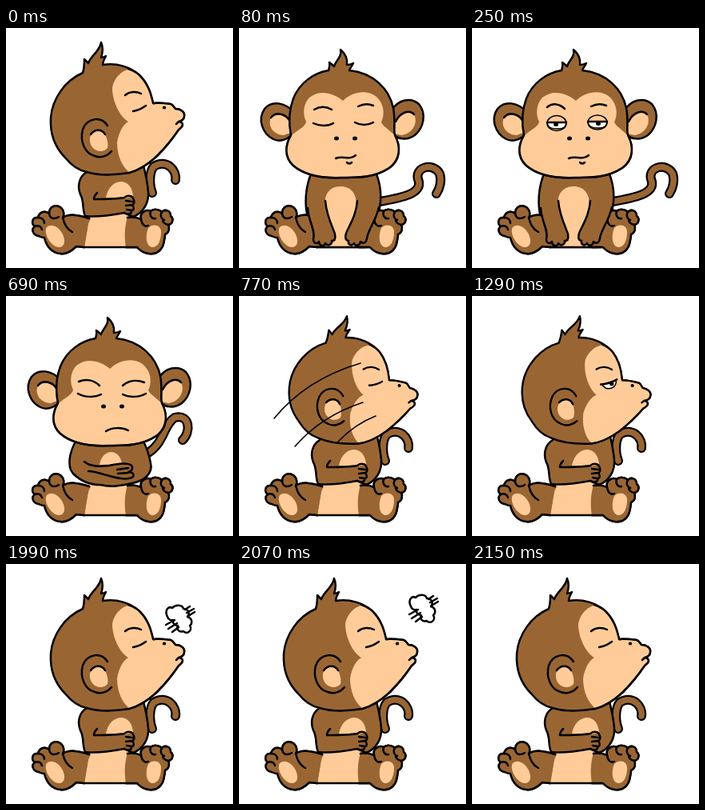
An HTML page that plays this animation: 284x300 px, repeating every 2590 ms.

```html
<!DOCTYPE html>
<html lang="en">
<head>
<meta charset="utf-8">
<title>Grumpy monkey</title>
<style>
  html, body { margin: 0; width: 100%; height: 100%; overflow: hidden; background: #fff; }
  svg { display: block; width: 100%; height: 100%; }
  path, ellipse { stroke: #000; stroke-width: 2.5; stroke-linecap: round; stroke-linejoin: round; fill: none; }
  .fur { fill: #996633; }
  .skin { fill: #ffcc99; }
  .white { fill: #fff; }
  .ink { fill: #000; stroke: none; }
  .flat { stroke: none; }
  .thin { stroke-width: 1.6; }
  .tail { stroke-width: 12; }
  .tail.inner { stroke: #996633; stroke-width: 7.5; }
  [data-part] { visibility: hidden; }
</style>
</head>
<body>
<svg viewBox="0 0 284 300">
  <defs>
    <g id="feet">
      <path class="fur" d="M98 274L88 273C82 279 76 283 68 282C58 281 51 274 48 262C45 262 43 261 41 260C34 259 31 252 36 248C31 244 33 236 40 237C42 229 50 228 54 232C54 223 62 220 68 224C73 228 73 234 71 237C78 232 88 233 104 238"/>
      <path d="M36 248C40 246 44 248 45 252M40 237C45 237 48 240 48 244M54 232C55 238 60 240 66 236M71 237C73 246 77 252 83 255"/>
      <path class="skin flat" d="M51 249C58 243 67 250 71 258C75 267 73 274 66 274C57 274 46 257 51 249Z"/>
      <path class="fur" d="M150 274L164 274C170 281 180 284 188 281C197 277 198 267 199 258C204 256 205 250 203 246C209 245 210 238 206 235C206 228 199 226 195 230C191 226 184 226 181 229C175 226 167 231 169 239C164 237 158 236 152 237"/>
      <path d="M169 239C170 246 174 249 178 247M181 229C179 235 183 239 187 238M195 230C192 235 195 239 198 240M203 246C199 245 196 243 196 240"/>
      <path class="skin flat" d="M178 250C184 244 194 246 194 255C194 266 190 274 183 274C175 273 174 260 178 250Z"/>
    </g>
    <g id="belly">
      <path class="skin flat" d="M98 232H156V274H97Z"/>
      <path class="fur flat" d="M152 236C148 250 148 262 150 274H164V236ZM106 238C100 250 97 262 98 274H92V236Z"/>
      <path d="M96 274H165"/>
    </g>
  </defs>

  <g data-part="relaxed">
    <path class="tail" d="M176 217C205 212 228 207 225 192C217 174 243 167 251 182C254 191 251 201 247 207"/>
    <path class="tail inner" d="M176 217C205 212 228 207 225 192C217 174 243 167 251 182C254 191 251 201 247 207"/>
    <use href="#feet"/>
    <path class="fur" d="M91 180C83 198 81 222 87 240L98 274H156L171 241C179 222 180 202 171 180Z"/>
    <path class="skin flat" d="M127 198C112 198 106 210 108 222C114 242 121 258 121 266L105 274H150L134 265C138 252 145 238 147 221C147 207 140 198 127 198Z"/>
    <use href="#feet"/>
    <path class="fur" d="M86 225C87 243 96 252 93 264C93 270 98 270 100 267C101 274 107 273 108 269C111 274 117 270 116 266C122 266 121 258 118 252C113 240 109 229 108 216"/>
    <path class="fur" d="M175 224C171 242 161 253 160 263C159 269 155 270 152 267C151 273 145 273 144 269C140 274 136 270 137 266C131 265 133 257 137 250C142 240 147 230 148 216"/>
    <path d="M97 274H160"/>
  </g>

  <g data-part="crossedFront">
    <path class="tail" d="M178 196C199 182 197 161 211 152C231 147 231 171 221 180"/>
    <path class="tail inner" d="M178 196C199 182 197 161 211 152C231 147 231 171 221 180"/>
    <use href="#belly"/>
    <use href="#feet"/>
    <path class="fur" d="M88 180C79 196 76 213 84 222C94 232 106 236 118 236C134 240 148 236 158 234C173 231 184 222 181 209C179 198 176 189 171 180Z"/>
    <path class="skin flat" d="M117 211C119 199 126 195 132 195C140 196 144 202 145 210Z"/>
    <path d="M98 207C106 214 118 213 129 212C140 210 150 208 156 211C160 214 158 219 153 220C161 220 162 227 154 228C144 230 134 226 126 224C117 222 109 218 103 219M139 217L153 215M140 222L153 221"/>
    <use href="#feet"/>
  </g>

  <g data-part="crossedSide">
    <path class="tail" d="M183 206C179 196 179 180 185 173C201 163 214 178 212 190"/>
    <path class="tail inner" d="M183 206C179 196 179 180 185 173C201 163 214 178 212 190"/>
    <use href="#belly"/>
    <use href="#feet"/>
    <path class="fur" d="M101 180C91 186 89 198 93 208C98 216 95 227 99 235C113 237 132 234 148 231L159 236C172 231 179 218 178 205C177 194 175 184 172 172"/>
    <path class="skin flat" d="M125 212C128 197 137 192 145 192C154 193 158 201 159 210L150 213Z"/>
    <path d="M114 206C111 209 110 212 110 214C123 214 137 214 148 212C152 209 158 209 159 213C162 217 160 220 158 221C161 225 160 228 157 228C158 232 153 234 148 231M150 216L158 217M150 222L158 221M151 227L157 228"/>
    <use href="#feet"/>
  </g>

  <g data-part="frontHead">
    <path class="fur" d="M68 105C58 93 41 90 32 101C23 114 29 132 43 139C51 143 61 139 65 134Z"/>
    <path class="skin flat" d="M64 117C59 107 46 104 40 112C35 123 44 134 56 134L64 131Z"/>
    <path d="M64 117C59 107 46 104 40 112"/>
    <path class="fur" d="M190 104C199 89 215 86 225 95C235 107 231 125 220 134C210 141 199 139 193 133Z"/>
    <path class="skin flat" d="M196 117C201 106 213 101 219 108C225 120 215 133 203 134L195 132Z"/>
    <path d="M196 117C201 106 213 101 219 108"/>
    <path class="fur" d="M112 53C113 49 114 46 113 43C116 45 118 47 119 48C121 40 129 37 127 27C133 32 136 39 135 46C138 46 141 45 143 44C141 48 139 50 138 53C168 56 188 76 193 100C196 115 193 126 195 134C202 147 203 164 188 175C168 188 147 187 128 187C103 188 82 184 68 172C56 161 58 146 65 134C62 119 62 104 68 88C76 68 94 56 112 53Z"/>
    <path class="skin flat" d="M65 135C72 128 83 124 84 117C79 107 81 94 88 87C100 77 117 80 130 91C143 78 163 77 173 87C181 95 183 107 178 118C182 125 190 128 195 135C201 148 202 164 187 174C168 186 147 186 128 186C103 187 82 183 68 171C57 160 59 146 65 135Z"/>
    <path d="M65 134C58 146 56 161 68 172C82 184 103 188 128 187C147 187 168 188 188 175C203 164 202 147 195 134"/>
    <ellipse class="ink" cx="122" cy="138" rx="3" ry="2.5"/>
    <ellipse class="ink" cx="145" cy="138" rx="3" ry="2.5"/>
  </g>

  <g data-part="smirk">
    <path d="M121 163C130 159 138 166 146 159M135 168C137 170 139 170 141 168"/>
    <path d="M149 98C155 95 161 94 168 97"/>
  </g>
  <g data-part="blink">
    <path d="M94 102C101 98 109 98 116 102M93 119C101 123 111 123 118 119M145 118C152 122 161 122 168 118"/>
  </g>
  <g data-part="stare">
    <path d="M94 99C101 93 110 95 116 101"/>
    <ellipse class="skin thin" cx="106" cy="119" rx="12" ry="9.5"/>
    <ellipse class="skin thin" cx="157" cy="118" rx="12" ry="9"/>
    <path class="white thin" d="M94 118H118C117 126 112 126 106 126C100 126 95 125 94 118Z"/>
    <path class="white thin" d="M145 117H169C168 125 163 125 157 125C151 125 146 124 145 117Z"/>
    <path d="M94 118H118M145 117H169"/>
    <ellipse class="ink" cx="105" cy="120.5" rx="3" ry="2.5"/>
    <ellipse class="ink" cx="158" cy="119.5" rx="3" ry="2.5"/>
  </g>
  <g data-part="frown">
    <path d="M91 107C100 103 110 105 117 112M146 112C153 106 163 104 173 108M90 122C99 127 111 127 119 123M146 123C154 127 166 127 175 122M125 169C133 164 145 164 153 168"/>
  </g>

  <g data-part="sideHead" id="side">
    <path class="fur" d="M96 56C98 50 98 44 98 39C100 41 102 43 103 44C106 34 117 30 119 18C122 25 121 31 119 37C121 37 123 36 125 35C123 39 121 42 121 46C139 43 156 49 167 59C177 69 181 80 184 94C191 93 199 94 206 95C209 96 210 99 212 101C217 101 224 104 223 110C223 114 220 116 216 117C222 118 223 122 216 127C208 139 199 150 189 160C177 171 166 178 154 181C136 184 117 185 101 180C91 178 82 172 74 162C60 148 55 130 56 112C58 89 73 66 96 56Z"/>
    <path class="skin flat" d="M153 52C142 54 133 67 133 77C134 95 144 112 153 117C146 121 141 131 139 143C139 159 145 173 154 180C166 177 177 170 188 159C198 149 207 138 215 127C222 122 221 118 216 117C220 115 222 113 222 109C222 105 217 102 212 102C209 99 208 96 205 96C199 95 191 94 184 96C181 80 176 70 167 60C163 56 158 53 153 52Z"/>
    <path d="M153 51C159 53 163 55 167 59C177 69 181 80 184 94C191 93 199 94 206 95C209 96 210 99 212 101C217 101 224 104 223 110C223 114 220 116 216 117C222 118 223 122 216 127C208 139 199 150 189 160C177 171 166 178 154 181M213 120L216 117"/>
    <ellipse class="ink" cx="198" cy="99.5" rx="2.2" ry="2"/>
    <path class="fur" d="M127 122C118 109 101 113 96 127C92 142 99 157 111 160C119 163 127 160 132 154"/>
    <path class="skin flat" d="M107 132C112 126 121 127 124 133C127 139 128 146 127 150C122 156 113 155 108 149C104 144 104 137 107 132Z"/>
    <path d="M106 133C111 126 120 126 124 133"/>
    <path d="M149 84C155 79 163 79 169 82"/>
    <path data-part="sideShut" d="M159 104C165 103 171 100 175 97"/>
    <g data-part="sideOpen">
      <path class="white thin" d="M158 103L176 95C178 103 172 108 164 107Z"/>
      <path d="M157 103C164 102 171 99 177 94"/>
      <ellipse class="ink" cx="171" cy="100.5" rx="2.8" ry="2.6"/>
    </g>
  </g>

  <path data-part="whoosh" class="thin" d="M44 153Q84 104 152 84M70 188Q103 150 155 133M124 182Q145 160 171 150"/>

  <g data-part="puff" id="puff">
    <path class="white" d="M202 66C198 58 203 52 208 55C212 50 221 51 222 56C229 56 230 63 227 66C234 68 233 75 230 77C234 83 226 89 222 84C216 86 213 81 215 77C211 77 208 74 209 70C206 71 203 69 202 66Z"/>
    <path d="M211 70L200 76M214 74L203 81M216 79L208 85M224 57L230 53M226 61L235 56M228 65L236 60"/>
  </g>
</svg>
<script>
const LOOP = 2590;
const side = "crossedSide sideHead ";
const front = "relaxed frontHead smirk ";
const level = "translate(117 139) rotate(7) scale(.96) translate(-115 -138)";

// start time, visible parts, head transform, puff transform
const steps = [
  [0, side + "sideShut"],
  [80, front + "blink"],
  [250, front + "stare"],
  [690, "crossedFront frontHead frown"],
  [770, side + "sideShut whoosh", level],
  [850, side + "sideShut", level],
  [1290, side + "sideOpen", level],
  [1990, side + "sideShut puff"],
  [2070, side + "sideShut puff", "", "translate(13 -13)"],
  [2150, side + "sideShut"]
];

const parts = [...document.querySelectorAll("[data-part]")];
const head = document.getElementById("side");
const puff = document.getElementById("puff");
let shown;

function show(step) {
  const [, names, tilt = "", drift = ""] = step;
  const on = new Set(names.split(" "));
  for (const el of parts) el.style.visibility = on.has(el.dataset.part) ? "visible" : "hidden";
  head.setAttribute("transform", tilt);
  puff.setAttribute("transform", drift);
}

const origin = performance.now();
function tick() {
  const t = (performance.now() - origin) % LOOP;
  const step = steps.findLast(s => s[0] <= t);
  if (step !== shown) show(shown = step);
  requestAnimationFrame(tick);
}
tick();
</script>
</body>
</html>
```
